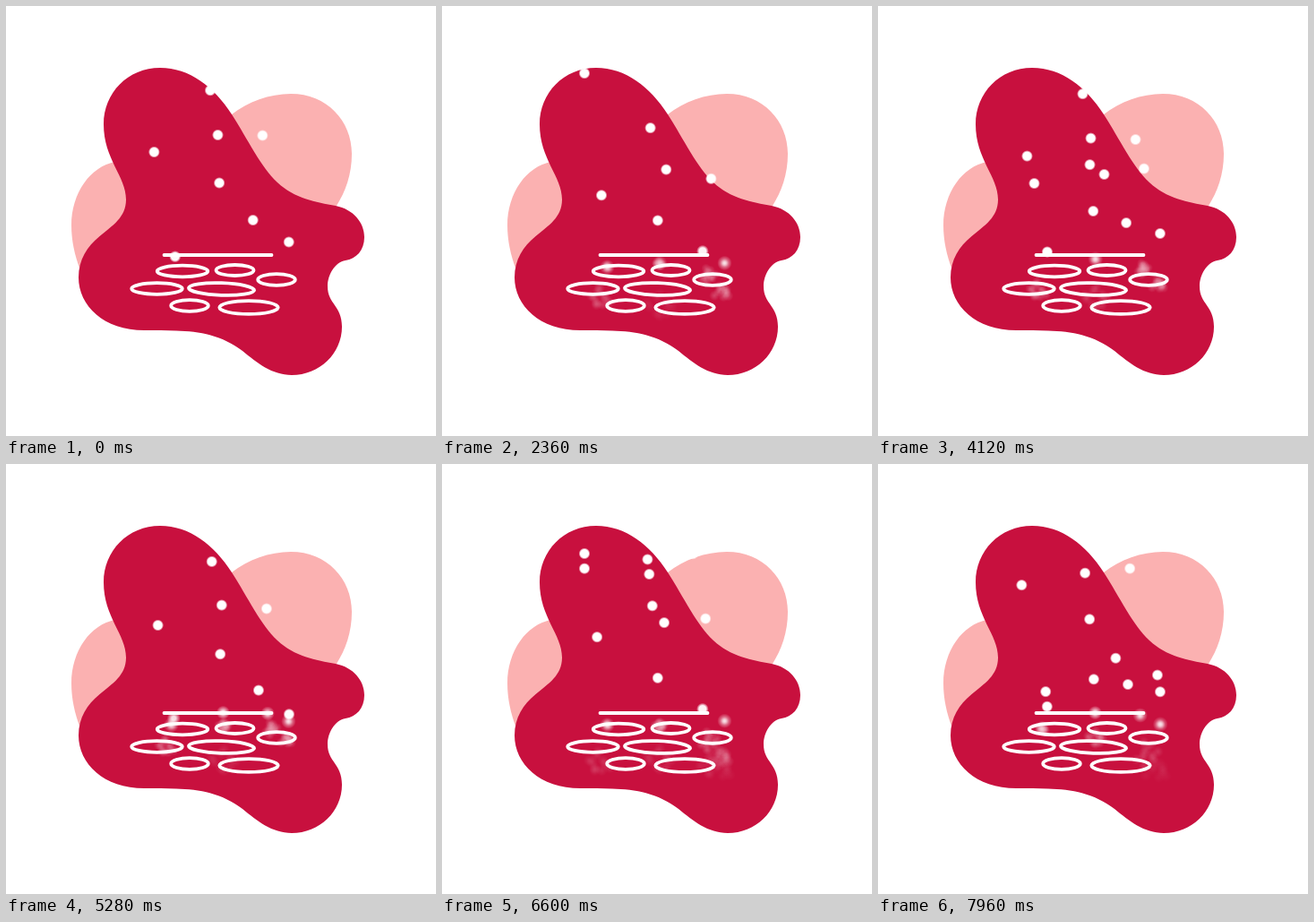
These frames come from a looping animation (480x480 px, 8 s). An HTML page with a canvas:

```html
<!DOCTYPE html>
<html lang="en">
<head>
<meta charset="utf-8">
<title>Falling drops</title>
<style>
html, body { margin: 0; width: 100%; height: 100%; overflow: hidden; background: #fff; }
canvas { display: block; width: 480px; height: 480px; }
</style>
</head>
<body>
<canvas id="stage"></canvas>
<script>
const LOOP = 8000;
const SIZE = 480;
const FADE = 1750;
const canvas = document.getElementById('stage');
const ctx = canvas.getContext('2d');
const ratio = window.devicePixelRatio || 1;
canvas.width = canvas.height = SIZE * ratio;

const pink = new Path2D(
  'M252 121C270 107 294 98 318 98C358 98 386 128 386 165C386 188 379 207 369 223L300 260L250 200Z' +
  'M122 174C94 179 73 209 73 245C73 262 77 279 82 292L150 280L150 200Z');
const red = new Path2D(
  'M172 69C205 69 232 90 252 121C270 149 284 179 303 197C322 215 346 219 368 223' +
  'C388 227 400 242 400 258C400 273 391 282 379 284C367 286 359 300 359 313' +
  'C359 333 375 334 375 358C375 388 350 412 319 412C297 412 280 398 264 385' +
  'C242 368 216 363 190 362.5C178 362 168 362 157 362C110 363 81 335 81 303' +
  'C81 283 91 268 104 257.5C119 245 134 236 134 216C134 190 109 171 109 132' +
  'C109 97 136 69 172 69Z');

// Rings: centre x, centre y, radius x, radius y, tilt
const rings = [
  [197, 296, 28.3, 6.3], [255.5, 295, 21, 6], [302, 305.5, 20.8, 6.3], [168.5, 315.5, 28.3, 6.3],
  [240.5, 316, 36.6, 6.8, 0.035], [205, 334.5, 20.8, 6.3], [271, 336.5, 32.7, 7.4]
];

const clamp = v => Math.min(1, Math.max(0, v));
const smooth = (y, from, to) => {
  const u = clamp((y - from) / (to - from));
  return u * u * (3 - 2 * u);
};
const rand = n => {
  const v = Math.sin(n * 127.1 + 11.7) * 43758.5453;
  return v - Math.floor(v);
};

// y0 and speed give the fall, x(y) bends it; lead is the head start of each drop in a close pair
const tracks = [
  { y0: 70, speed: 0.1133, top: 50, surface: 279, drift: -10, lead: [0, 0],
    x: y => 159 + 30 * smooth(y, 114, 279) },
  { y0: 13.4, speed: 0.0984, top: 88, surface: 272, drift: 2, lead: [386, 534],
    x: y => 242 - 14 * (1 - clamp((y - 94) / 180)) ** 1.5 },
  { y0: 69.7, speed: 0.0905, top: 98, surface: 272, drift: 7, lead: [100, 177],
    x: y => 228 + 87 * smooth(y, 90, 370) },
  { y0: 51.5, speed: 0.1133, top: 88, surface: 279, drift: -2, lead: [-18, 18],
    x: y => 280 + 36 * smooth(y, 98, 272) }
];

// Drops fall in pairs, either far apart or close together
const farPairs = [-1870, 64, 3260, 6336];
const closePairs = [2316, 5514];

function dot(x, y, r, alpha, solid) {
  const g = ctx.createRadialGradient(x, y, 0, x, y, r);
  g.addColorStop(0, `rgba(255,255,255,${alpha})`);
  g.addColorStop(solid, `rgba(255,255,255,${alpha})`);
  g.addColorStop(1, 'rgba(255,255,255,0)');
  ctx.fillStyle = g;
  ctx.beginPath();
  ctx.arc(x, y, r, 0, Math.PI * 2);
  ctx.fill();
}

function wisps(x, y, age, seed) {
  const k = (age - 150) / (FADE - 150);
  if (k <= 0) return;
  const alpha = 0.2 * clamp(k * 4) * clamp((1 - k) * 3);
  for (let i = 0; i < 10; i++) {
    const angle = i * 0.628 + rand(seed * 20 + i);
    const reach = (4 + 14 * rand(seed * 20 + i + 50)) * k;
    dot(x + Math.cos(angle) * reach, y + Math.sin(angle) * reach, 4 + 3 * k, alpha, 0.1);
  }
}

function drop(track, t, seed) {
  const { y0, speed, top, surface, drift } = track;
  const age = t - (surface - y0) / speed;
  if (age > FADE) return;
  if (age < 0) {
    const y = y0 + speed * t;
    if (y > top) dot(track.x(y), y, 6.5, 1, 0.7);
    return;
  }
  // Below the surface a drop slows down, blurs and breaks up
  const x = track.x(surface) + drift * age / 1000;
  const y = surface + 0.0275 * age + 0.02 * Math.max(0, age - 800);
  wisps(x, y, age, seed);
  const alpha = clamp(1 - age / 1120);
  dot(x, y, 6.5 + Math.min(2, age * 0.006), alpha, Math.max(0.1, 0.7 - age / 450));
}

function scenery() {
  ctx.fillStyle = '#fff';
  ctx.fillRect(0, 0, SIZE, SIZE);
  ctx.fillStyle = '#fbb1b1';
  ctx.fill(pink);
  ctx.fillStyle = '#c8103e';
  ctx.fill(red);
}

function water() {
  ctx.strokeStyle = '#fff';
  ctx.lineWidth = 3.8;
  ctx.lineCap = 'round';
  ctx.beginPath();
  ctx.moveTo(176.5, 278);
  ctx.lineTo(296.5, 278);
  ctx.stroke();
  for (const [x, y, rx, ry, tilt = 0] of rings) {
    ctx.beginPath();
    ctx.ellipse(x, y, rx, ry, tilt, 0, Math.PI * 2);
    ctx.stroke();
  }
}

function draw(time) {
  ctx.setTransform(ratio, 0, 0, ratio, 0, 0);
  scenery();
  water();
  tracks.forEach((track, i) => {
    for (let n = 0; n < 2; n++) {
      for (const start of farPairs) drop(track, time - start - n * 1050, i + 1);
      for (const start of closePairs) drop(track, time - start - n * 675 + track.lead[n], i + 1);
    }
  });
}

const begin = performance.now();
function frame() {
  draw((performance.now() - begin) % LOOP);
  requestAnimationFrame(frame);
}
frame();
</script>
</body>
</html>
```
